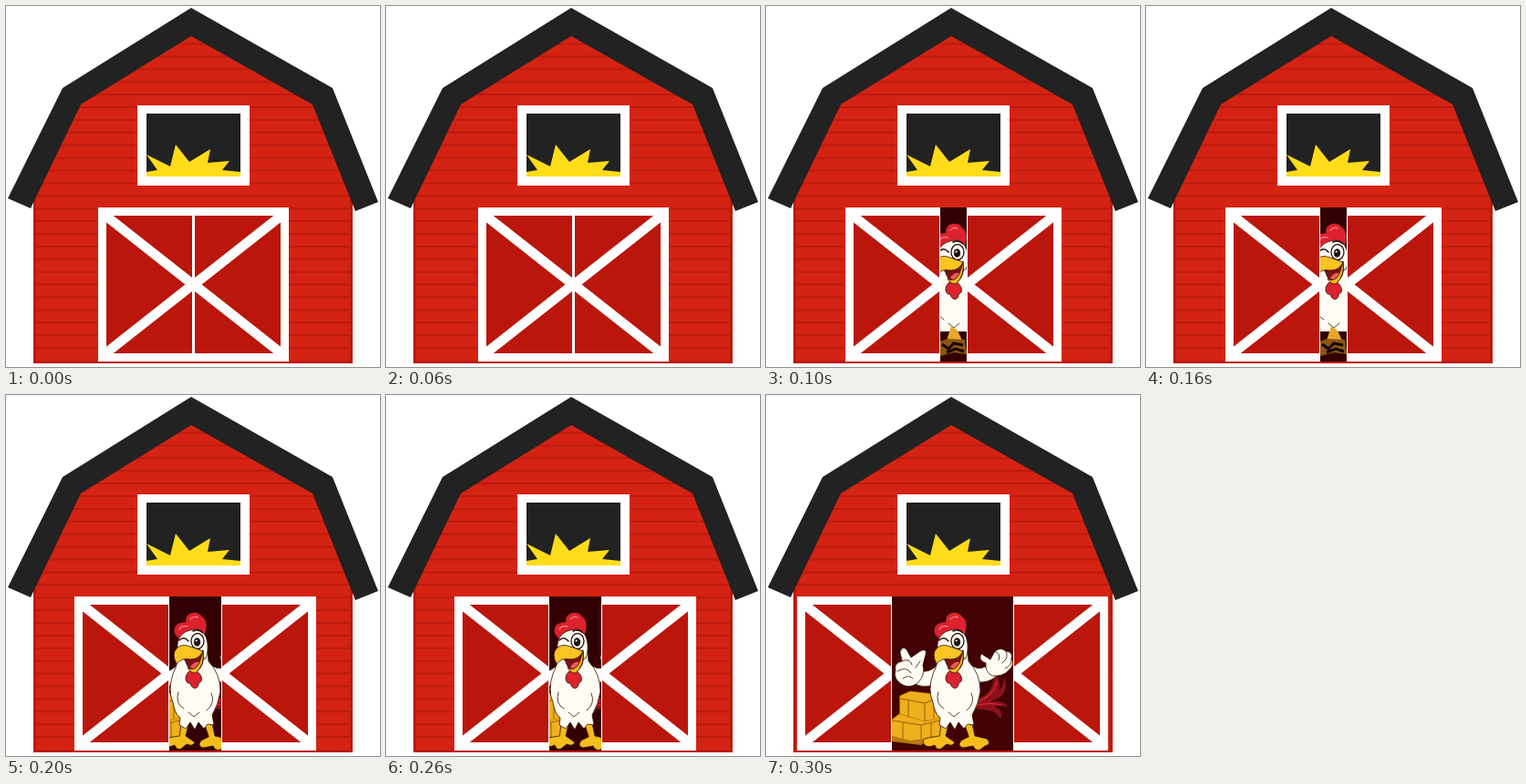
An HTML page that plays this animation: 410x396 px, repeating every 0.4 s.

```html
<!DOCTYPE html>
<html lang="en">
<head>
<meta charset="utf-8">
<title>Barn doors</title>
<style>
  html, body { margin: 0; width: 100%; height: 100%; overflow: hidden; background: #fff; }
  svg { display: block; width: 410px; height: 396px; }
</style>
</head>
<body>
<svg viewBox="0 0 410 396">
  <defs>
    <clipPath id="wallClip"><path id="wall" d="M203 30 340 106 380 212V392H30V212L78 106Z"/></clipPath>
    <clipPath id="doorClip"><path d="M101 221H205V390H101Z"/></clipPath>
    <clipPath id="openingClip"><rect id="openingShape" y="221" height="169"/></clipPath>
    <g id="door" clip-path="url(#doorClip)">
      <path fill="#fff" d="M101 221H205V390H101Z"/>
      <path fill="#bb160b" d="M110 230H204V381H110Z"/>
      <path fill="none" stroke="#fff" stroke-width="10.5" d="M104 226 205 305.5 104 385"/>
    </g>
  </defs>

  <use href="#wall" fill="#d42313"/>
  <g id="siding" clip-path="url(#wallClip)" stroke="#bd1a0e" stroke-width="2"></g>
  <path fill="none" stroke="#bd1a0e" stroke-width="3" d="M31.5 212V390.5H378.5V212"/>
  <path fill="#222" d="M203 2 358 90 408 215 383 225 336 108 203 33 82 108 27 222 2 211 62 90Z"/>

  <path fill="#fff" d="M144 109H267V197H144Z"/>
  <path fill="#222" d="M154 118H257V187H154Z"/>
  <path fill="#ffdc1a" d="M154 187V182L166 180 154 163 180 176 186 152 201 171 224 157 221 172 245 170 237 180 257 182V187Z"/>

  <g clip-path="url(#openingClip)">
    <rect id="backdrop" x="130" y="221" width="150" height="169"/>
    <g id="rooster" stroke="#30120a" stroke-width=".8" stroke-linejoin="round" stroke-linecap="round">
      <!-- hay bales -->
      <g fill="#eeb01d" stroke="#b87910">
        <path d="M138 356 146 350 194 352V378L160 382 138 374Z"/>
        <path d="M147 330 158 325 192 329V354L174 358 147 350Z"/>
        <path fill="none" stroke-width="1.5" d="M147 333 174 338V358M174 338 192 331M138 357 170 362V380M170 362 194 356M156 335V353M184 334V354M150 359V377M181 360V378"/>
        <path fill="#b87910" stroke="none" d="M138 374 158 379 180 376 170 384 138 380Z"/>
      </g>
      <!-- tail -->
      <g fill="#8f101d">
        <path d="M226 334C240 333 250 324 250 305 256 309 258 317 255 324 260 320 261 313 260 308 269 322 258 333 248 336 258 335 264 337 265 344 259 340 254 341 251 342 258 344 260 350 257 356 252 345 241 346 227 344Z"/>
        <path fill="none" stroke="#d32630" stroke-width="1.3" d="M230 337Q249 331 253 315M232 340Q248 337 258 340"/>
      </g>
      <!-- legs and feet -->
      <g fill="#f4bd1b">
        <path d="M193 355 201 358 197 374 207 381Q205 386 198 383L192 388Q187 390 185 384 177 388 173 383 170 377 178 376L190 374Z"/>
        <path d="M217 358 225 355 229 374 242 377Q248 383 240 385L235 389Q230 391 227 385L216 387Q209 385 214 379L222 375Z"/>
      </g>
      <!-- body and wings -->
      <g fill="#fffdf3">
        <path d="M187 297Q177 306 169 302L160 315Q173 324 188 316Z"/>
        <path d="M222 294Q232 303 240 298L253 308Q243 318 226 314Z"/>
        <path d="M190 280Q189 294 183 306 177 324 183 337 185 350 191 354L190 362 197 366 202 359 207 367 211 359 217 366 221 361 228 362 226 351Q233 339 235 325 235 306 222 292L220 272Z"/>
        <path d="M147 282Q149 275 154 279L159 288 169 281Q177 277 175 285L172 296Q175 308 166 316 158 322 150 318 139 312 142 302 140 294 149 292Z"/>
        <path d="M236 284Q232 291 241 294 240 304 248 308 260 309 266 302 273 296 269 289 271 282 263 281 257 276 251 281L246 290Z"/>
        <path fill="none" d="M149 292Q158 288 160 296M144 303Q154 297 159 305M150 311Q157 306 161 311M169 292 164 299M251 281Q258 284 255 291M263 281Q267 288 259 294M269 289Q270 297 262 300M189 326Q185 339 195 344M225 327Q230 338 220 346M200 348 206 353 212 348"/>
      </g>
      <!-- comb and head -->
      <path fill="#dc222e" d="M192 268C180 264 182 248 197 249 195 238 211 235 215 243 221 246 221 256 218 263Z"/>
      <path fill="none" stroke="#f2777a" stroke-width="1.5" d="M190 257Q193 252 199 254M202 246Q206 242 210 244"/>
      <path fill="#fffdf3" d="M188 277C187 263 198 257 210 257 222 260 223 278 219 289L197 292Z"/>
      <ellipse cx="210" cy="270" rx="7" ry="8.5" fill="#fff" stroke-width="1.3"/>
      <ellipse cx="209.5" cy="271" rx="3.2" ry="4.3" fill="#171313"/>
      <circle cx="208.7" cy="269.5" r="1.1" fill="#fff" stroke="none"/>
      <path fill="none" stroke-width="1.6" d="M190 269Q195 264 200 270M205 259Q211 256 216 261"/>
      <!-- beak and wattle -->
      <path fill="#dc222e" d="M202 302C193 309 198 318 202 316 204 325 212 322 211 316 217 315 215 306 208 302Z"/>
      <path fill="#7c1015" d="M196 289 216 280Q219 297 208 304 199 303 196 289Z"/>
      <path fill="#e85a56" stroke="none" d="M202 298Q208 290 214 294 211 302 206 302Z"/>
      <path fill="#f8b91b" d="M216 281Q218 296 208 305 202 305 199 299 207 304 212 294Z"/>
      <path fill="#fac421" d="M187 295Q181 284 187 278 193 272 202 276L216 281Q212 290 202 290 192 288 187 295Z"/>
    </g>
    <g id="narrowStraw">
      <path fill="#330003" d="M190 357H222V390H190Z"/>
      <path fill="#e6a72c" d="M198 367 203 351 210 356 215 367Z"/>
      <path fill="#8b5710" d="M190 368 199 365 218 366 220 382 206 380 191 384Z"/>
      <path fill="none" stroke="#170303" stroke-width="3" d="M193 371 200 376 206 370 216 372M198 380 208 376 217 379"/>
    </g>
  </g>

  <use id="leftDoor" href="#door"/>
  <use id="rightDoor" href="#door"/>
</svg>
<script>
  const byId = id => document.getElementById(id);
  const set = (id, name, value) => byId(id).setAttribute(name, value);
  const show = (id, visible) => { byId(id).style.display = visible ? "" : "none"; };

  const STEP_MS = 100;
  const leftShift = [0, 14, 26, 67];
  const rightShift = [0, 14, 30, 65];

  let boards = "";
  for (let i = 0; i < 25; i++) boards += `M30 ${(41.5 + i * 13.9).toFixed(1)}H380`;
  byId("siding").innerHTML = `<path d="${boards}"/>`;

  function draw(time) {
    const step = Math.floor(time / STEP_MS) % 4;
    const left = leftShift[step], right = rightShift[step];
    set("leftDoor", "transform", `translate(${-left})`);
    set("rightDoor", "transform", `translate(${411 + right}) scale(-1 1)`);
    set("openingShape", "x", 205 - left);
    set("openingShape", "width", 1 + left + right);
    set("backdrop", "fill", ["#fff", "#330003", "#330003", "#430203"][step]);
    show("rooster", step > 0);
    show("narrowStraw", step === 1);
  }

  const start = performance.now();
  function tick() {
    draw(performance.now() - start);
    requestAnimationFrame(tick);
  }
  tick();
</script>
</body>
</html>
```
